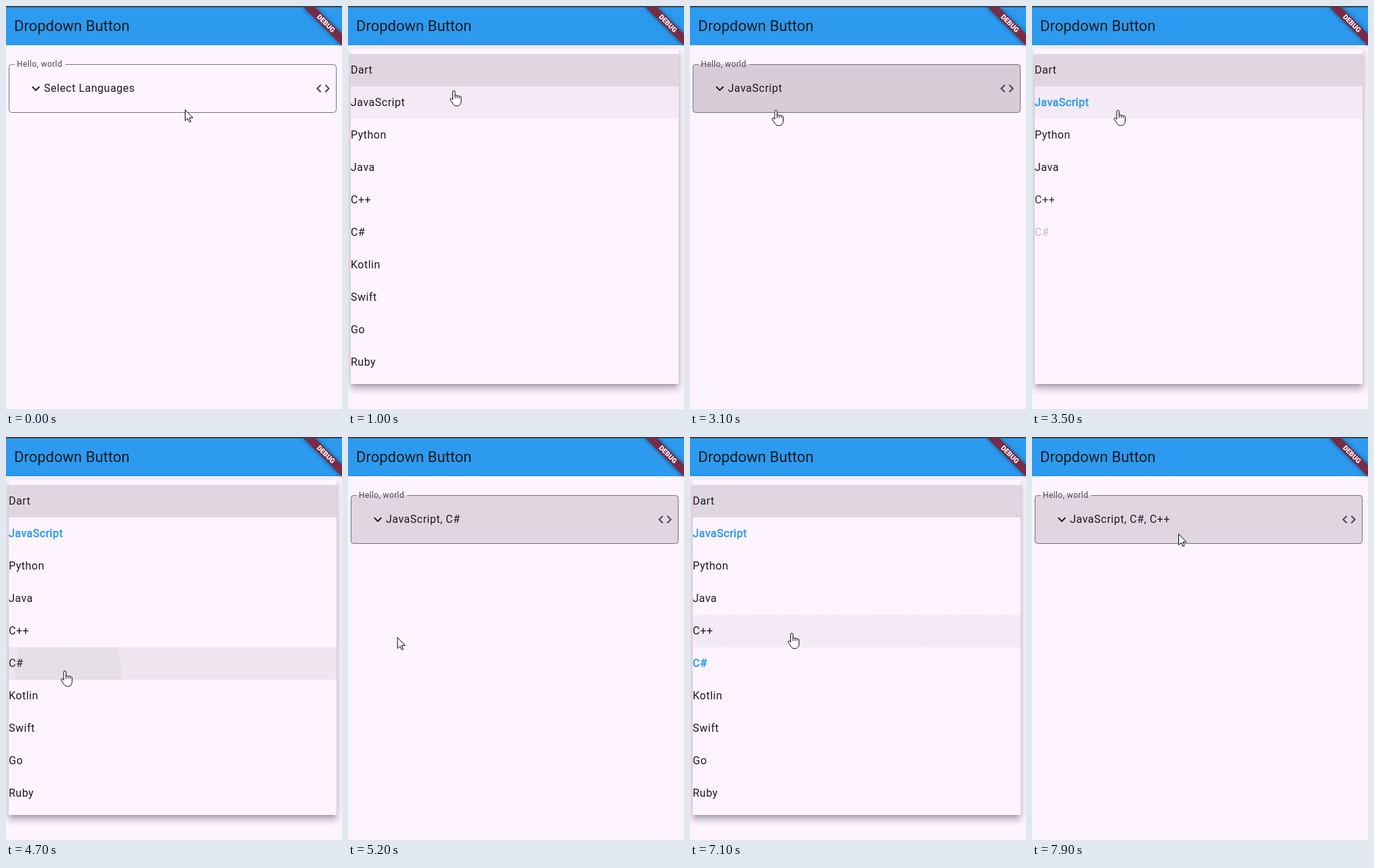
Animation, 496 px wide and 596 px high, one loop 8 s. Source, as an HTML page:

```html
<!DOCTYPE html>
<html lang="en">
<head>
<meta charset="utf-8">
<title>Dropdown Button</title>
<style>
  html, body { margin: 0; width: 100%; height: 100%; overflow: hidden; }
  #stage {
    position: relative; width: 496px; height: 596px; overflow: hidden;
    background: #fef4ff; color: #1d1b20;
    font: 16px/48px Roboto, sans-serif; letter-spacing: .5px; white-space: nowrap;
  }
  #stage * { position: absolute; }
  #bar {
    left: 0; top: 0; width: 484px; height: 56px; padding-left: 12px;
    border-top: 2px solid #3b444d; background: #2c9aee;
    font-size: 22px; line-height: 56px; letter-spacing: 0;
  }
  .ink { overflow: hidden; left: 4px; width: 484px; }
  .ripple { border-radius: 50%; background: #c8c8c8; }
  #field { top: 86px; height: 72px; border-radius: 4px; }
  #art { left: 0; top: 0; }
  #label {
    left: 16px; top: 76px; font-size: 12px; line-height: 20px;
    letter-spacing: .375px; color: #49454f;
  }
  #value { left: 56px; top: 98px; }
  #menu { left: 0; top: 0; width: 496px; height: 596px; }
  #panel {
    left: 4px; width: 484px; border-radius: 2px; background: #fef4ff;
    box-shadow: 0 5px 5px -3px #0003, 0 8px 10px 1px #00000024, 0 3px 14px 2px #0000001f;
  }
  .item { left: 4px; }
  .chosen { color: #2c9aee; -webkit-text-stroke: .6px #2c9aee; }
  #corner { left: 396px; top: 2px; width: 100px; height: 100px; overflow: hidden; }
  #ribbon {
    left: 60px; top: 28px; width: 80px; height: 12px; transform-origin: 40px -28px;
    transform: rotate(45deg); background: #792b46; box-shadow: 0 0 6px #0008;
    color: #fff; font-size: 10.2px; font-weight: 900; line-height: 12px;
    letter-spacing: 0; text-align: center;
  }
  #cursor { left: 0; top: 0; overflow: visible; }
  #cursor path { fill: #fff; stroke: #000; stroke-linejoin: round; }
</style>
</head>
<body>
<div id="stage">
  <div id="bar">Dropdown Button</div>
  <div id="field" class="ink"><div class="ripple"></div></div>
  <svg id="art" width="496" height="200">
    <path fill="none" stroke="#79707f" d="M12.5 86.5H8.5a4 4 0 0 0-4 4V153.500a4 4 0 0 0 4 4H483.500a4 4 0 0 0 4-4V90.500a4 4 0 0 0-4-4H87.500"/>
    <path fill="#1d1b20" transform="translate(32 110)" d="M7.410 8.590L12 13.170l4.590-4.580L18 10l-6 6-6-6z"/>
    <path fill="#49454f" transform="translate(456 110)" d="M9.400 16.600L4.800 12l4.600-4.600L8 6l-6 6 6 6zM14.600 16.600l4.600-4.600-4.600-4.600L16 6l6 6-6 6z"/>
  </svg>
  <div id="label">Hello, world</div>
  <div id="value"></div>
  <div id="menu"><div id="panel"></div></div>
  <div id="corner"><div id="ribbon">DEBUG</div></div>
  <svg id="cursor" width="20" height="26">
    <path id="arrow" d="M.5 .5V16.800L4.300 13.200L6.800 18.800L9 17.800L6.600 12.300H11.800z"/>
    <path id="hand" transform="translate(-6 -.5)" d="M4.600 14V2.300a1.700 1.700 0 0 1 3.400 0V8.200c.4-.9 2.700-.9 3.100 .3c.6-.8 2.600-.6 3 .6c.7-.6 2.900-.3 2.900 1.600V16.500c0 4-2.500 6.800-6 6.800h-1c-3 0-4.300-1.800-5.500-4L.9 14.200c-.9-1.600 1.300-3 2.500-1.600zM8 8.200v4M11.100 8.500v3.500M14.100 9.100v3"/>
  </svg>
</div>
<script>
  const LOOP = 8000, STEP = 100;
  const names = ['Dart', 'JavaScript', 'Python', 'Java', 'C++', 'C#', 'Kotlin', 'Swift', 'Go', 'Ruby'];
  const visits = [
    { open: 600, close: 2033, pick: 1 },
    { open: 3267, close: 4790, pick: 5 },
    { open: 6350, close: 7290, pick: 4 }
  ];
  // row -1 is the field
  const presses = [
    { row: -1, down: 500, up: 600 }, { row: 1, down: 1935, up: 2033 },
    { row: -1, down: 3170, up: 3267 }, { row: 5, down: 4652, up: 4790 },
    { row: -1, down: 6255, up: 6350 }, { row: 4, down: 7200, up: 7290 }
  ];
  // time, x, y
  const path = [
    [0, 264, 153], [400, 200, 130], [600, 196, 129], [1000, 156, 125], [1800, 127, 150],
    [1900, 126.5, 154], [3700, 126.5, 154], [4450, 86.5, 346], [4900, 86.5, 346],
    [5450, 62, 258], [6150, 186.5, 142], [6400, 186.5, 142], [7100, 150, 290],
    [7400, 150, 290], [7850, 216, 143], [8000, 216, 143]
  ];

  const $ = id => document.getElementById(id);
  const clamp = v => Math.max(0, Math.min(1, v));
  const span = (v, a, b) => clamp((v - a) / (b - a));
  const mix = (a, b, k) => a + (b - a) * k;

  // cubic-bezier(.25, .1, .25, 1)
  function ease(x) {
    const bez = (a, b, s) => 3 * a * s * (1 - s) ** 2 + 3 * b * s * s * (1 - s) + s ** 3;
    let lo = 0, hi = 1;
    for (let n = 0; n < 20; n++) {
      const mid = (lo + hi) / 2;
      if (bez(.25, .25, mid) < x) lo = mid; else hi = mid;
    }
    return bez(.1, 1, lo);
  }

  function add(parent, cls, top, height) {
    const el = document.createElement('div');
    el.className = cls;
    el.style.top = top + 'px';
    el.style.height = height + 'px';
    parent.append(el);
    return el;
  }

  const rows = names.map((name, i) => {
    const ink = add($('menu'), 'ink', 71 + 48 * i, 48);
    add(ink, 'ripple', 0, 0);
    const text = add($('menu'), 'item', 71 + 48 * i, 48);
    text.textContent = name;
    return { ink, text };
  });

  function pointer(t) {
    const i = path.findIndex((p, n) => n && t <= p[0]);
    const a = path[i - 1], b = path[i];
    const s = span(t, a[0], b[0]), k = s * s * (3 - 2 * s);
    return [mix(a[1], b[1], k), mix(a[2], b[2], k)];
  }

  function paintInk(el, row, t, focus, hover) {
    const top = row < 0 ? 86 : 71 + 48 * row, height = row < 0 ? 72 : 48;
    const press = presses.filter(p => p.row === row && t >= p.down).pop();
    const circle = el.firstElementChild.style;
    let glow = 0;
    circle.opacity = 0;
    if (press) {
      const { down, up } = press;
      glow = span(t, down, down + 200);
      if (t > up) glow = span(up, down, down + 200) * (1 - span(t, up, up + 200));
      const held = Math.min(t, up) - down;
      const k = ease(clamp(held / 1000 + Math.max(0, t - up) / 225));
      const reach = Math.hypot(484, height) / 2;
      const r = mix(reach * .3, reach + 5, k);
      const [px, py] = pointer(down);
      circle.left = mix(px - 4, 242, k) - r + 'px';
      circle.top = mix(py - top, height / 2, k) - r + 'px';
      circle.width = circle.height = 2 * r + 'px';
      circle.opacity = .4 * span(t, down, down + 75) * (1 - span(t, up + 225, up + 375));
    }
    el.style.background = [`rgba(188,188,188,${.4 * glow})`, `rgba(0,0,0,${hover ? .04 : 0})`, `rgba(0,0,0,${.12 * focus})`]
      .map(c => `linear-gradient(${c},${c})`).join();
  }

  function draw(t) {
    const [x, y] = pointer(t);
    const hand = (t > 200 && t < 4850) || (t > 5950 && t < 7350);
    const visit = visits.filter(v => t >= v.open).pop();
    const done = visits.filter(v => t >= v.close);
    const closing = visit && t >= visit.close;
    const phase = !visit ? 0 : closing ? 1 - span(t, visit.close, visit.close + 300) : span(t, visit.open, visit.open + 300);

    let focus = 0;
    if (done.length) focus = closing ? span(t, visit.close, visit.close + 78) : 1 - span(t, visit.open, visit.open + 50);
    paintInk($('field'), -1, t, focus, hand && !phase && y < 158);
    $('value').textContent = done.map(v => names[v.pick]).join(', ') || 'Select Languages';

    $('menu').style.opacity = closing ? span(phase, .75, 1) : span(phase, 0, .25);
    const grow = closing ? 1 : ease(span(phase, .25, .5));
    const top = mix(71, 63, grow);
    $('panel').style.top = top + 'px';
    $('panel').style.height = mix(119, 559, grow) - top + 'px';

    const unit = .5 / (names.length + 1.5);
    const over = hand && phase ? Math.floor((y - 71) / 48) : -1;
    rows.forEach(({ ink, text }, i) => {
      paintInk(ink, i, t, i === 0 ? 1 : 0, i === over);
      const start = .5 + (i + 1) * unit;
      text.style.opacity = i ? span(phase, start, start + 1.5 * unit) : 1;
      const chosen = visit && visits.some(v => v.pick === i && v.close < visit.open);
      text.classList.toggle('chosen', !!chosen);
    });

    $('cursor').style.transform = `translate(${x}px, ${y}px)`;
    $('hand').style.display = hand ? '' : 'none';
    $('arrow').style.display = hand ? 'none' : '';
  }

  function tick() {
    draw(Math.floor(performance.now() % LOOP / STEP) * STEP);
    requestAnimationFrame(tick);
  }
  tick();
</script>
</body>
</html>
```
